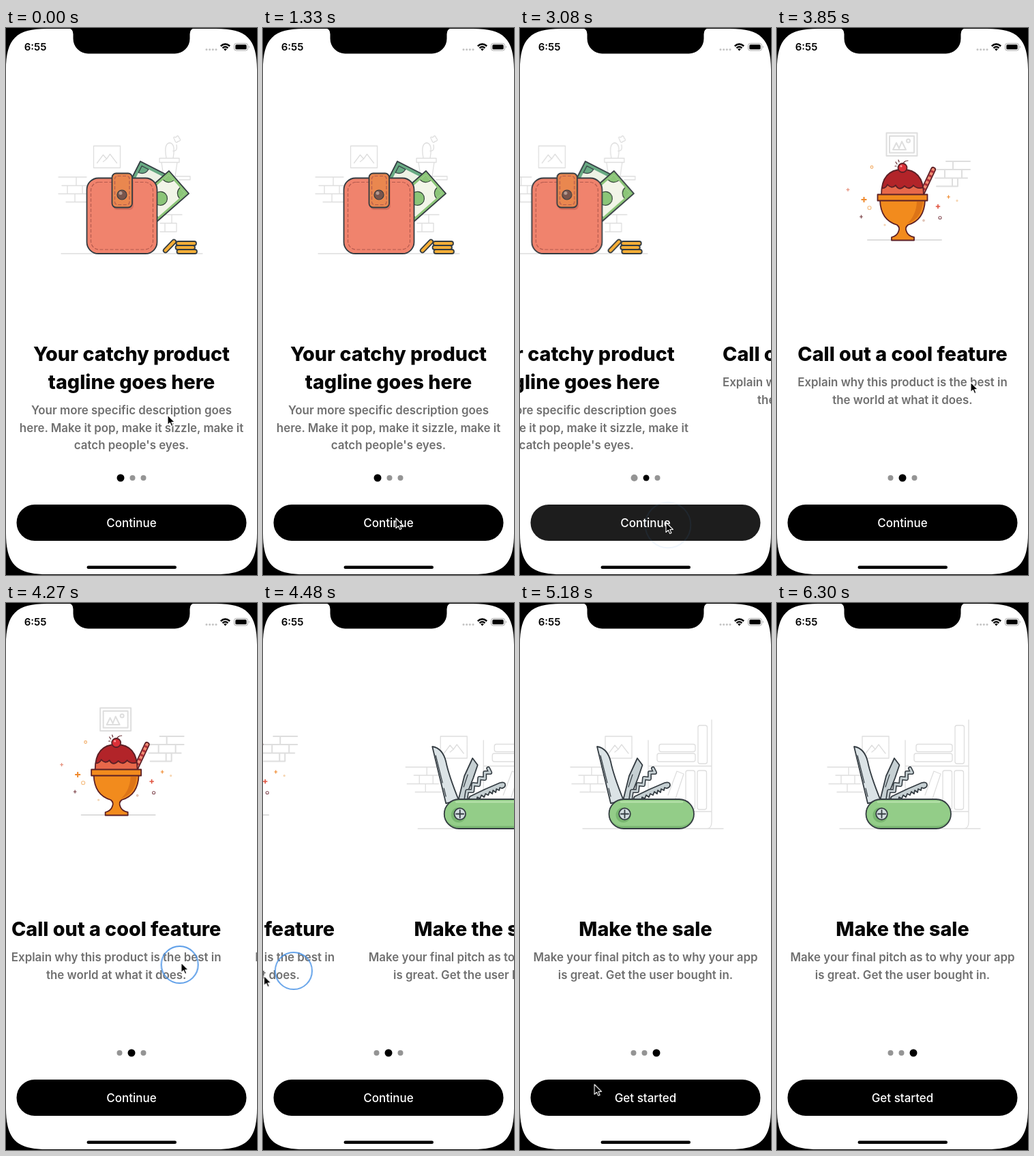
Recreate the animation shown at these times as an HTML page. Size 368 by 800 pixels, loop 6.37 s.

```html
<!DOCTYPE html>
<html lang="en">
<head>
<meta charset="utf-8">
<title>Onboarding</title>
<style>
html, body { margin: 0; width: 100%; height: 100%; overflow: hidden; background: #000; }
svg { display: block; width: 368px; height: 800px; font-family: Inter, "Open Sans", sans-serif; font-optical-sizing: none; }
text { text-anchor: middle; }
.title { font-size: 28.7px; font-weight: 800; fill: #050505; }
.desc { font-size: 16.9px; font-weight: 600; fill: #707070; }
.label { font-size: 17px; font-weight: 500; fill: #fff; }
.faint { fill: none; stroke: #dedede; stroke-width: 1.3; stroke-linejoin: round; stroke-linecap: round; }
.ink, .plum { stroke: #343c42; stroke-width: 1.8; stroke-linejoin: round; stroke-linecap: round; }
.plum { stroke: #5c2026; }
.thin { stroke-width: 1.2; }
.bold { stroke-width: 2; }
.stitch { fill: none; stroke: #b45a4e; stroke-width: 1.2; stroke-dasharray: 5 2.5; }
.none { fill: none; }

.track, .dot, .button, .first, .last, .ring, .pointer { animation: 6370ms linear infinite; }
.track { animation-name: slide; }
.dot { cy: 658px; fill: #949494; }
.d1 { animation-name: dot1; }
.d2 { animation-name: dot2; }
.d3 { animation-name: dot3; }
.button { animation-name: press; }
.first { animation-name: leave; }
.last { animation-name: enter; }
.ring { animation-name: touch; fill: none; stroke: #4a93e6; stroke-width: 2; }
.pointer { animation-name: point; }

@keyframes slide {
  0%, 46.54% { transform: translateX(0); animation-timing-function: ease-in-out; }
  51.57% { transform: translateX(-368px); }
  65.93% { transform: translateX(-368px); animation-timing-function: ease-in; }
  70.33% { transform: translateX(-600px); animation-timing-function: ease-out; }
  75%, 100% { transform: translateX(-736px); }
}
@keyframes dot1 {
  0%, 46.9% { cx: 168px; r: 5.5px; fill: #000; }
  46.91% { fill: #949494; }
  51.6%, 100% { cx: 166.5px; r: 4px; fill: #949494; }
}
@keyframes dot2 {
  0%, 46.9% { cx: 185.5px; r: 4px; fill: #949494; }
  46.91% { fill: #000; }
  51.6%, 74.7% { cx: 184px; r: 5.5px; fill: #000; }
  74.71% { fill: #949494; }
  79.4%, 100% { cx: 182.5px; r: 4px; fill: #949494; }
}
@keyframes dot3 {
  0%, 74.7% { cx: 201.5px; r: 4px; fill: #949494; }
  74.71% { fill: #000; }
  79.4%, 100% { cx: 200px; r: 5.5px; fill: #000; }
}
@keyframes press {
  0%, 43.95% { opacity: 1; }
  45.7% { opacity: .35; animation-timing-function: ease-in-out; }
  49.45%, 100% { opacity: 1; }
}
@keyframes leave {
  0%, 74.7% { opacity: 1; }
  74.71%, 100% { opacity: 0; }
}
@keyframes enter {
  0%, 74.7% { opacity: 0; }
  74.71%, 100% { opacity: 1; }
}
@keyframes touch {
  0%, 43.9% { transform: translate(217px, 727px); r: 27px; opacity: 0; }
  43.95%, 45.7% { transform: translate(217px, 727px); r: 27px; opacity: .9; }
  48.65% { transform: translate(217px, 727px); r: 34px; opacity: 0; }
  65.9% { transform: translate(277px, 528px); r: 27px; opacity: 0; }
  65.93% { transform: translate(277px, 528px); r: 27px; opacity: .9; animation-timing-function: ease-in; }
  70.33% { transform: translate(45px, 538px); r: 27px; opacity: .85; }
  72.5%, 100% { transform: translate(20px, 538px); r: 34px; opacity: 0; }
}
@keyframes point {
  0% { transform: translate(237px, 566px); animation-timing-function: ease-in-out; }
  18% { transform: translate(197px, 714px); }
  20.88% { transform: translate(195px, 717px); }
  34% { transform: translate(197px, 718px); animation-timing-function: ease-in-out; }
  42.5%, 48.35% { transform: translate(214px, 723px); animation-timing-function: ease-in-out; }
  58% { transform: translate(284px, 516px); }
  60.44% { transform: translate(284px, 518px); }
  65.93% { transform: translate(284px, 524px); animation-timing-function: ease-in; }
  70.33% { transform: translate(2px, 545px); animation-timing-function: ease-out; }
  71.5% { transform: translate(-25px, 550px); }
  73.5% { transform: translate(-18px, 560px); animation-timing-function: ease-in-out; }
  81.32% { transform: translate(109px, 704px); }
  86%, 89% { transform: translate(150px, 726px); animation-timing-function: ease-in; }
  94.5%, 100% { transform: translate(190px, 815px); }
}
</style>
</head>
<body>
<svg viewBox="0 0 368 800">
  <defs>
    <path id="photo" class="faint" d="M0 0H39V32H0ZM5 25L14 13L19 19L24 12L34 25M14 23L19 19"/>
    <path id="plus" d="M-4 0H4M0-4V4"/>
    <path id="screw" d="M162 288L164 275L172 275L173 265L181 266L182 256L190 257L190 248L198 248L195 242"/>
    <path id="straw" d="M212 243L229 207"/>
    <clipPath id="cash"><rect x="4" y="4" width="36" height="64"/></clipPath>
    <clipPath id="dome"><path d="M153 244Q153 207 184 207Q215 207 215 244Z"/></clipPath>
    <clipPath id="handle"><rect x="130" y="287" width="125" height="43" rx="21.5"/></clipPath>
  </defs>

  <rect width="368" height="800" fill="#fff"/>

  <g class="track">
    <!-- wallet -->
    <g>
      <use href="#photo" x="128.5" y="172.5"/>
      <path class="faint" d="M81 330H288M77 218H118M82 230.5H118M77 242.5H118M88 254.5H118M103 218V230.5M90 230.5V242.5M112 230.5V242.5M101 242.5V254.5
        M222 273H258M226 285.5H250M226 298H249M243 273V285.5M233 285.5V298M250 285.5V298
        M207 217H270V222H254M225 190.5H254V196.5H225ZM228 196.5L231 217M251 196.5L248 217
        M235 190Q231 169 240 168Q249 169 245 190M245 180Q252 180 250 171M247 163Q244 158 249 160Q252 155 254 161Q258 165 252 166Q249 170 247 163"/>
      <g transform="translate(197 195) rotate(27)">
        <rect class="ink" width="50" height="44" fill="#68aa83"/>
        <path d="M5 5H46V40H5Z" fill="#edf2e5"/>
        <path class="ink thin" d="M5 5H16Q15 15 5 16Z" fill="#68aa83"/>
      </g>
      <g transform="translate(239 209) rotate(48.7)">
        <rect class="ink" width="44" height="72" fill="#8bc578"/>
        <rect x="4" y="4" width="36" height="64" fill="#f2f5e8"/>
        <g clip-path="url(#cash)" fill="#8bc578" stroke="#36463c" stroke-width="1.2">
          <circle cx="4" cy="4" r="11"/><circle cx="40" cy="4" r="11"/>
          <circle cx="40" cy="68" r="11"/><circle cx="22" cy="36" r="10"/>
        </g>
      </g>
      <rect class="ink" x="118.5" y="219.5" width="103" height="110.5" rx="17" fill="#f0836d"/>
      <rect class="stitch" x="124.5" y="225.5" width="91" height="98.5" rx="12"/>
      <rect x="157" y="219" width="30" height="47" rx="6" fill="#d66f5d"/>
      <rect class="ink" x="155.5" y="212.5" width="29.5" height="50" rx="6" fill="#e9874f"/>
      <rect class="stitch" x="159.5" y="216.5" width="21.5" height="42" rx="4"/>
      <circle class="ink thin" cx="170" cy="244" r="7" fill="#78554c"/>
      <circle cx="168" cy="241.5" r="2.5" fill="#b49a90"/>
      <g class="ink" fill="#f6ae36">
        <rect x="228" y="316" width="24" height="6" rx="3" transform="rotate(-46 240 319)"/>
        <rect x="249.5" y="312" width="29.5" height="6" rx="3"/>
        <rect x="248.5" y="318" width="28.5" height="6" rx="3"/>
        <rect x="250.5" y="324" width="29.5" height="6" rx="3"/>
      </g>
      <text class="title" x="184" y="487">Your catchy product</text>
      <text class="title" x="184" y="528">tagline goes here</text>
      <text class="desc" x="184" y="565">Your more specific description goes</text>
      <text class="desc" x="184" y="590.5">here. Make it pop, make it sizzle, make it</text>
      <text class="desc" x="184" y="616">catch people's eyes.</text>
    </g>

    <!-- sundae -->
    <g transform="translate(368)">
      <g class="faint bold">
        <path d="M160.5 153.5H205.5V187H160.5ZM165 158H201V182.5H165ZM170 178L175 168L179 176L183 166L189 178ZM133 310H241"/>
        <circle cx="192.5" cy="165" r="2.5"/>
        <path d="M248 195H283M232 207H283M232 219.5H279M234 231.5H265M258 195V207M246 207V219.5M271 207V219.5M257 219.5V231.5M265 219.5V231.5"/>
      </g>
      <g stroke-width="4.5">
        <use href="#straw" stroke="#5c2026" stroke-width="8" stroke-linecap="round"/>
        <use href="#straw" stroke="#f08b72" stroke-linecap="round"/>
        <use href="#straw" stroke="#b3303a" stroke-dasharray="3 4"/>
      </g>
      <g clip-path="url(#dome)">
        <rect x="150" y="205" width="68" height="40" fill="#e8684a"/>
        <path class="plum" d="M150 205V234Q159 236 162 229Q168 236 174 230Q179 239 187 231Q194 238 200 230Q206 237 218 232V205Z" fill="#b22429"/>
      </g>
      <path class="plum none" d="M153 244Q153 207 184 207Q215 207 215 244"/>
      <path class="plum none thin" d="M184 200Q186 194 192 194M174 196L176 199M178 193L179 196M173 202H175"/>
      <circle class="plum" cx="184" cy="204.5" r="6.5" fill="#dc3038"/>
      <circle cx="182" cy="202" r="1.5" fill="#f7a0a0"/>
      <path class="plum" d="M151 252Q152 281 176 288Q181 292 178 298Q176 304 168 306V310.5H201V306Q192 304 190 298Q187 292 192 288Q216 281 217 252Z" fill="#f28b1d"/>
      <path d="M205 254H214Q212 279 191 286Q204 274 205 254Z" fill="#dd7417"/>
      <rect class="plum" x="147.5" y="243.5" width="73" height="9" fill="#f28b1d"/>
      <g fill="none" stroke-width="2">
        <use href="#plus" transform="translate(127.5 251)" stroke="#ef8a2e"/>
        <use href="#plus" transform="translate(236 261) scale(.8)" stroke="#e0533f"/>
        <use href="#plus" transform="translate(251.5 247) scale(.6)" stroke="#ef8a2e"/>
        <use href="#plus" transform="translate(104 236.5) scale(.6)" stroke="#e58a75"/>
        <use href="#plus" transform="translate(123.5 276) scale(.6)" stroke="#7a4046"/>
        <g stroke-width="1.2">
          <circle cx="139" cy="203.5" r="1.8" stroke="#f2b06d"/>
          <circle cx="135.5" cy="263" r="2.5" stroke="#f5bf85"/>
          <circle cx="239" cy="277.5" r="2" stroke="#8d5a62"/>
          <circle cx="215" cy="281.5" r="1.2" stroke="#d9b5a5"/>
          <circle cx="158" cy="288" r="1" stroke="#f2cfaa"/>
          <circle cx="264" cy="252.5" r="1" stroke="#f5cfa5"/>
        </g>
      </g>
      <text class="title" x="184" y="487">Call out a cool feature</text>
      <text class="desc" x="184" y="524">Explain why this product is the best in</text>
      <text class="desc" x="184" y="549.5">the world at what it does.</text>
    </g>

    <!-- pocket knife -->
    <g transform="translate(736)">
      <use href="#photo" x="125" y="195"/>
      <g class="faint">
        <path d="M92 330H298M74 240H124M86 252H122M76 264.5H122M88 276.5H125M105 240V252M94 252V264.5M114 252V264.5M103 264.5V276.5
          M188 201V288M281 171V320Q281 329 275 330M188 238.5H281M188 305H281M217 281L230 246L240 250L228 286"/>
        <rect x="204" y="206.5" width="53" height="11" rx="3"/>
        <rect x="201" y="220" width="56" height="12" rx="3"/>
        <rect x="261" y="179" width="13.5" height="56" rx="3"/>
        <rect x="243" y="245" width="13.5" height="57" rx="3"/>
        <rect x="260" y="245" width="13.5" height="57" rx="3"/>
      </g>
      <g class="ink" fill="#c6d0d3">
        <path d="M165 289L168 283Q190 272 212 263Q220 261 220 266Q220 270 215 271L212 270L211 274L207 272L206 277L202 274L201 279L197 276L195 281L191 279L189 284L185 281L183 286L179 284L178 289Z"/>
        <path d="M151 289L160 253L172 227L179.5 237L173 256L160 289Z"/>
        <path d="M133 293L113 210Q128 212 133 232Q137 252 152 289Z" fill="#dbe3e6"/>
        <path class="none thin" d="M118 223L128 263M130 271L133 283M159 269L165 251"/>
      </g>
      <g fill="none" stroke-linejoin="round" stroke-linecap="round">
        <use href="#screw" stroke="#343c42" stroke-width="6"/>
        <use href="#screw" stroke="#c6d0d3" stroke-width="2.8"/>
      </g>
      <g clip-path="url(#handle)">
        <rect x="130" y="287" width="125" height="43" fill="#7bb873"/>
        <rect x="130" y="283" width="125" height="43" rx="20" fill="#93cd88"/>
        <path d="M148 291H238" stroke="#b4e0a8" stroke-width="2.5" stroke-linecap="round"/>
      </g>
      <rect class="ink none" x="130.5" y="287" width="124.5" height="43" rx="21.5"/>
      <circle cx="151.5" cy="310" r="11" fill="#78b670"/>
      <circle class="ink" cx="153.5" cy="308.5" r="8.3" fill="#d3dde0"/>
      <path class="ink" d="M148 308.5H159M153.5 303V314"/>
      <text class="title" x="184" y="487">Make the sale</text>
      <text class="desc" x="184" y="524">Make your final pitch as to why your app</text>
      <text class="desc" x="184" y="549.5">is great. Get the user bought in.</text>
    </g>
  </g>

  <circle class="dot d1"/>
  <circle class="dot d2"/>
  <circle class="dot d3"/>

  <g class="button">
    <rect x="15.5" y="697" width="337" height="53" rx="26.5"/>
    <text class="label first" x="184" y="730">Continue</text>
    <text class="label last" x="184" y="730">Get started</text>
  </g>

  <!-- status bar, notch and bezel -->
  <text x="43" y="33.3" font-size="15" font-weight="600">6:55</text>
  <g fill="#c4c4c4">
    <circle cx="294" cy="31.5" r="1.5"/><circle cx="298.7" cy="31.5" r="1.5"/>
    <circle cx="303.3" cy="31.5" r="1.5"/><circle cx="308" cy="31.5" r="1.5"/>
  </g>
  <path d="M314.8 26.5Q321.5 20.5 328.2 26.5M317.5 29.3Q321.5 25.8 325.5 29.3" fill="none" stroke="#000" stroke-width="2.4"/>
  <path d="M319 30.8Q321.5 29 324 30.8L321.5 33.5Z"/>
  <rect x="334.5" y="22.5" width="20" height="10.5" rx="3" fill="none" stroke="#a8a8a8"/>
  <rect x="336.3" y="24.3" width="16.4" height="7" rx="1.6"/>
  <path d="M356 26Q358 27.7 356 29.5Z" fill="#a8a8a8"/>
  <rect x="118.5" y="786.5" width="131.5" height="4.5" rx="2.25"/>
  <path fill-rule="evenodd" d="M0 0H368V800H0ZM0 61C0 16 15 1 60 1H308C353 1 368 16 368 61V739C368 784 353 799 308 799H60C15 799 0 784 0 739Z"/>
  <path d="M91 0Q98.5 1 98.5 9V15.500A22 22 0 0 0 120.500 37.500H247.500A22 22 0 0 0 269.500 15.500V9Q269.500 1 277 0Z"/>

  <circle class="ring" r="27"/>
  <path class="pointer" d="M0 0V14.5L3.4 11.4L5.6 16.4L8 15.4L5.8 10.5H10.4Z" stroke="#fff" stroke-width="1.1" stroke-linejoin="round"/>
</svg>
</body>
</html>
```
